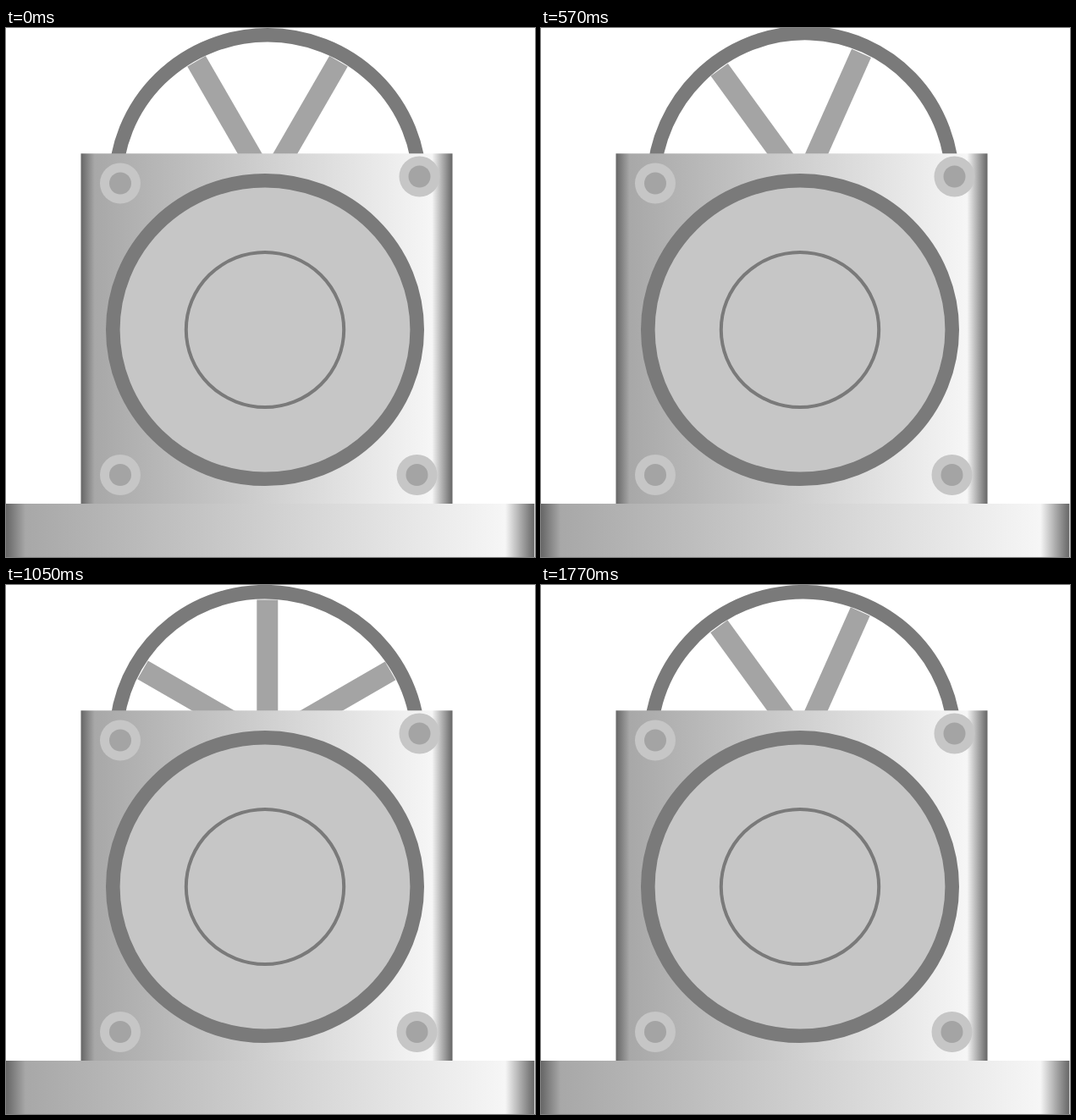
An HTML page that plays this animation: 625x625 px, repeating every 1.8 s.

```html
<!DOCTYPE html>
<html lang="en">
<head>
<meta charset="utf-8">
<title>Flywheel</title>
<style>
  html, body { margin: 0; width: 100%; height: 100%; overflow: hidden; background: #fff; }
  svg { display: block; width: 100vw; height: 100vh; }
</style>
</head>
<body>
<svg viewBox="0 0 625 625">
  <defs>
    <linearGradient id="steel">
      <stop offset="0" stop-color="#666"/>
      <stop offset=".037" stop-color="#a8a8a8"/>
      <stop offset=".945" stop-color="#f6f6f6"/>
      <stop offset="1" stop-color="#666"/>
    </linearGradient>
    <g id="bolt">
      <circle r="24" fill="#c6c6c6"/>
      <circle r="13" fill="#a4a4a4"/>
    </g>
  </defs>

  <!-- The wheel is slightly oval and slightly off its pivot, so it wobbles -->
  <g id="wheel">
    <g transform="translate(0 -.4)">
      <g stroke="#a4a4a4" stroke-width="25">
        <path d="M-170 0H170"/>
        <path d="M-167.8 0H167.8" transform="rotate(60)"/>
        <path d="M-167.8 0H167.8" transform="rotate(-60)"/>
      </g>
      <ellipse rx="179.7" ry="176.3" fill="none" stroke="#7a7a7a" stroke-width="16.6"/>
    </g>
  </g>

  <rect x="88.5" y="148.3" width="439" height="414" fill="url(#steel)"/>
  <rect y="562" width="624.3" height="63" fill="url(#steel)"/>

  <g transform="translate(306 356.5)" fill="#c6c6c6" stroke="#7a7a7a">
    <ellipse rx="179.7" ry="176.3" stroke-width="16.6"/>
    <ellipse rx="93.2" ry="91.5" stroke-width="4"/>
  </g>

  <use href="#bolt" x="135" y="183.5"/>
  <use href="#bolt" x="488.5" y="175.5"/>
  <use href="#bolt" x="135" y="528"/>
  <use href="#bolt" x="485.5" y="528"/>
</svg>
<script>
  const LOOP = 1800, STEP = 30;
  const wheel = document.getElementById('wheel');

  function draw() {
    const time = performance.now() % LOOP;
    const angle = Math.floor(time / STEP) * STEP / LOOP * 360;
    wheel.setAttribute('transform', `translate(309 185) rotate(${angle})`);
    requestAnimationFrame(draw);
  }
  draw();
</script>
</body>
</html>
```
